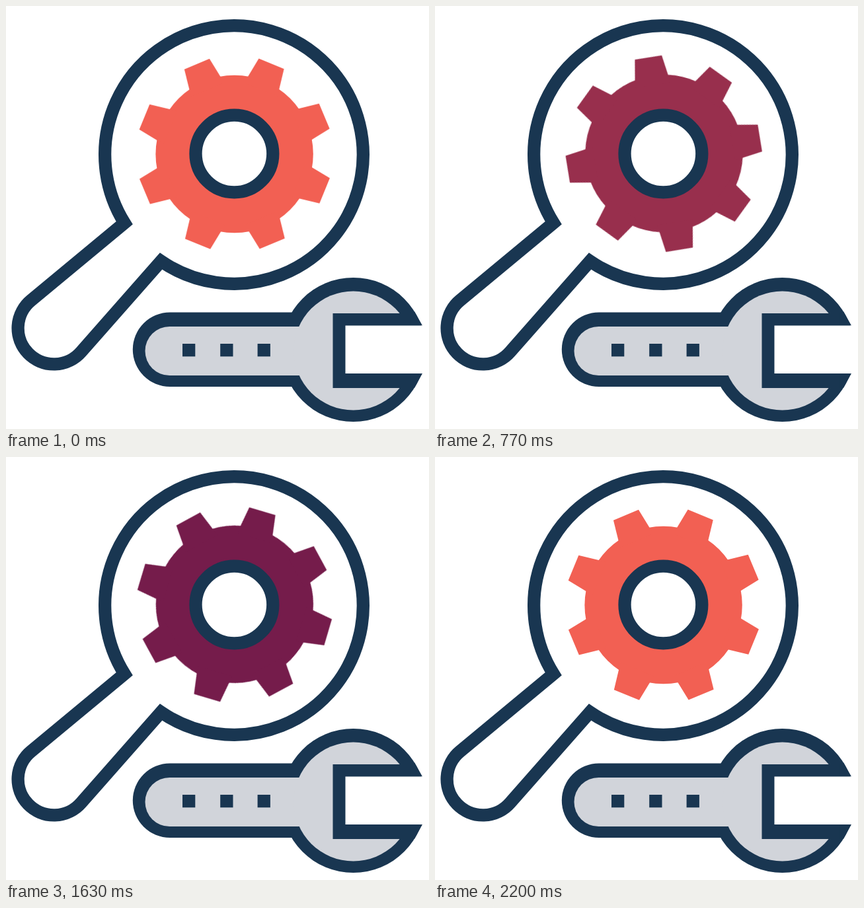
These frames come from a looping animation (640x640 px, 2230 ms). An HTML page:

```html
<!DOCTYPE html>
<html lang="en">
<head>
<meta charset="utf-8">
<title>Service icon</title>
<style>
  html, body { margin: 0; width: 100%; height: 100%; overflow: hidden; background: #fff; }
  svg { display: block; width: 100vw; height: 100vh; }
  .navy { fill: #193651; }
  .grey { fill: #d1d4da; }
  .line { fill: #fff; stroke: #193651; stroke-width: 19.3; stroke-miterlimit: 10; }
  #gear { transform-origin: 346px 223.5px; fill: #f26053; }
</style>
</head>
<body>
<svg viewBox="0 0 640 640">
  <path class="line" d="M179.2 328.2 L38.4 445 A54.5 54.5 0 1 0 113.9 523 L234.5 386 A195.3 195.3 0 1 0 179.2 328.2 Z"/>

  <g id="gear"><circle cx="345.6" cy="224" r="119.2"/></g>
  <circle class="line" cx="345.4" cy="223.5" r="58.4"/>

  <g class="navy">
    <rect x="191.8" y="463.5" width="300" height="112.6" rx="56.3"/>
    <circle cx="525.5" cy="520" r="109"/>
    <path d="M618 462 L630 483.5 H600 Z M618 578 L630 556 H600 Z"/>
  </g>
  <g class="grey">
    <rect x="210.5" y="485" width="290" height="74" rx="37"/>
    <circle cx="525.5" cy="521.5" r="90"/>
  </g>
  <g class="navy">
    <rect x="494.5" y="465" width="118" height="113"/>
    <rect x="267" y="511" width="19.3" height="19.3"/>
    <rect x="324.2" y="511" width="19.3" height="19.3"/>
    <rect x="380.6" y="511" width="19.3" height="19.3"/>
  </g>
  <rect x="513.5" y="483.5" width="126.5" height="72.5" fill="#fff"/>
</svg>
<script>
  const LOOP = 2230;
  const gear = document.getElementById('gear');

  for (let i = 0; i < 8; i++) {
    const tooth = document.createElementNS('http://www.w3.org/2000/svg', 'path');
    tooth.setAttribute('d', 'M-27.2 -105 L-20.6 -147.3 H20.6 L27.2 -105 Z');
    tooth.setAttribute('transform', `translate(345.8 223.7) rotate(${22.3 + 45 * i})`);
    gear.append(tooth);
  }

  // One swing drives both turn and tone: [time, share of the full swing]
  const TURN = -300;
  const light = [242, 96, 83], dark = [80, 8, 73];
  const swing = [
    [0, 0], [150, .03], [330, .131], [550, .335], [770, .554], [1030, .805],
    [1270, .962], [1390, 1], [1500, .94], [1630, .771], [1750, .565],
    [1870, .345], [2040, .1], [2170, .006], [2200, 0], [LOOP, 0]
  ];
  const mix = k => `rgb(${light.map((v, i) => Math.round(v + (dark[i] - v) * k))})`;

  gear.animate(
    swing.map(([t, k]) => ({
      offset: t / LOOP,
      transform: `rotate(${TURN * k}deg)`,
      fill: mix(k)
    })),
    { duration: LOOP, iterations: Infinity }
  );
</script>
</body>
</html>
```
